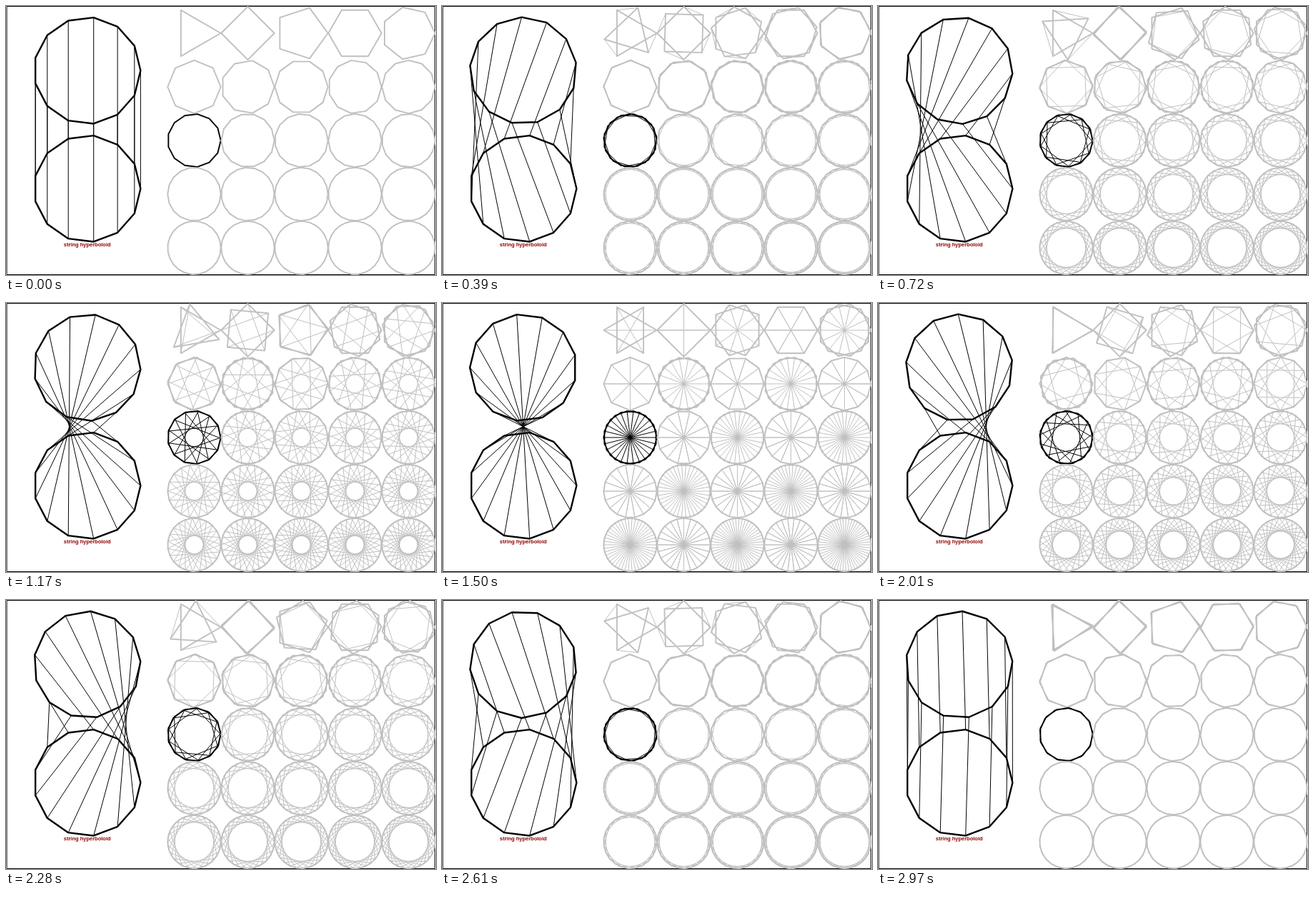
An HTML page for the animation above (3000 ms loop, 602x376 px).

```html
<!DOCTYPE html>
<html lang="en">
<head>
<meta charset="utf-8">
<title>String hyperboloid</title>
<style>
  html, body { margin: 0; width: 100%; height: 100%; overflow: hidden; background: #fff; }
  svg { display: block; }
  path, rect { fill: none; stroke-linejoin: round; stroke-linecap: round; }
  text { font: bold 7.5px "Liberation Sans", Arial, sans-serif; fill: #900000; text-anchor: middle; }
</style>
</head>
<body>
<svg width="602" height="376" viewBox="0 0 602 376">
  <rect x="1.5" y=".5" width="599" height="375" stroke="#000"/>
  <g id="art"></g>
  <text x="113.7" y="336">string hyperboloid</text>
</svg>
<script>
const PERIOD = 3000, STEP = 30, CELL = 75, FEATURED = 13;
const art = document.getElementById('art');

function addPath(color, width) {
  const path = document.createElementNS('http://www.w3.org/2000/svg', 'path');
  path.setAttribute('stroke', color);
  path.setAttribute('stroke-width', width);
  return art.appendChild(path);
}

// Two n-gons, the second one turning, with strings between matching corners.
function makeFigure(n, x, y1, y2, r, color, rimWidth) {
  const strings = addPath(color, 1), rims = addPath(color, rimWidth);
  const corners = (y, turn) => Array.from({ length: n }, (_, k) => {
    const a = 2 * Math.PI * k / n + turn;
    return (x + r * Math.cos(a)).toFixed(2) + ' ' + (y + r * Math.sin(a)).toFixed(2);
  });
  const ring = points => 'M' + points.join('L') + 'Z';
  const base = corners(y1, 0);
  return turn => {
    const top = corners(y2, turn);
    strings.setAttribute('d', base.map((p, k) => `M${p}L${top[k]}`).join(''));
    rims.setAttribute('d', ring(base) + ring(top));
  };
}

const figures = [makeFigure(FEATURED, 113.7, 255.3, 90.3, 74.7, '#000', 2.4)];
for (let i = 0; i < 25; i++) {
  const n = i + 3;
  const x = 263.5 + CELL * (i % 5), y = 38 + CELL * Math.floor(i / 5);
  figures.push(makeFigure(n, x, y, y, 37.2, n === FEATURED ? '#000' : '#c0c0c0', 1.9));
}

function draw() {
  const step = Math.floor(performance.now() % PERIOD / STEP);
  const turn = 2 * Math.PI * step * STEP / PERIOD;
  figures.forEach(update => update(turn));
  requestAnimationFrame(draw);
}
draw();
</script>
</body>
</html>
```
